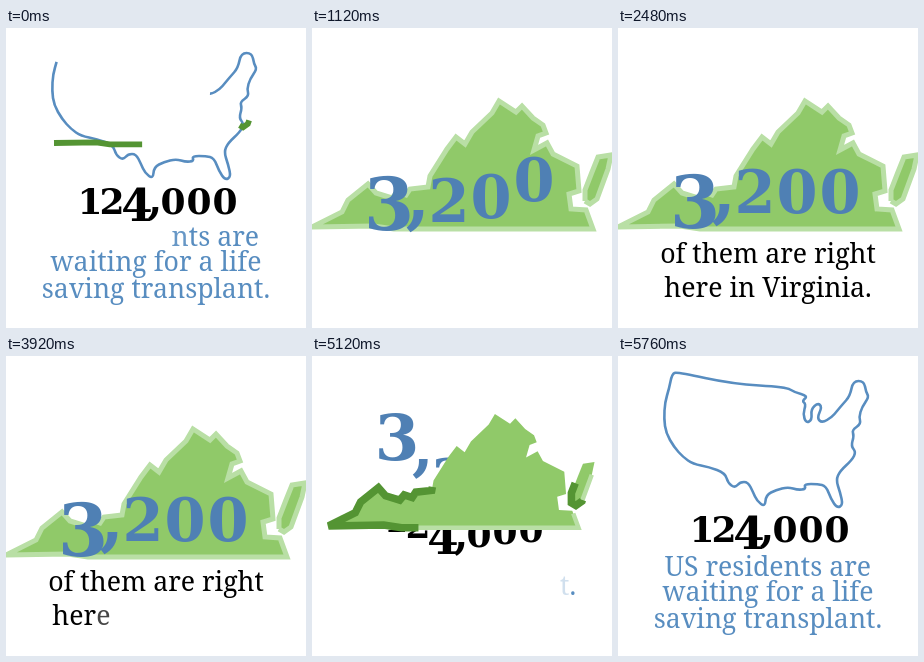
These frames come from a looping animation (300x300 px, 5.84 s). An HTML page:

```html
<!DOCTYPE html>
<html lang="en">
<head>
<meta charset="utf-8">
<title>Waiting for a transplant</title>
<style>
  html, body { margin: 0; width: 100%; height: 100%; overflow: hidden; background: #fff; }
  svg { display: block; width: 100%; height: 100%; }
  text { text-anchor: middle; }
  .copy { font: 26.7px "Noto Serif", serif; }
  .digit { font-family: "DejaVu Serif", serif; font-weight: bold; }
  #usa { fill: none; stroke: #588dc0; stroke-width: 2.6; stroke-linejoin: round; }
  .land { fill: #90c969; }
  .pale { fill: none; stroke: #b9dfa5; stroke-width: 5; }
  .dark { fill: none; stroke: #549433; stroke-width: 8.5; }
</style>
</head>
<body>
<svg viewBox="0 0 300 300">
  <path id="usa" pathLength="1"/>
  <g id="residents" fill="#588dc0"></g>
  <g id="total"></g>
  <g id="behind"></g>
  <g id="virginia"></g>
  <g id="front"></g>
  <g id="local"></g>
</svg>
<script>
const LOOP = 5840, MIRROR = 5600, STEP = 80;
const $ = id => document.getElementById(id);
const clamp = v => Math.min(1, Math.max(0, v));
const progress = (t, from, to) => clamp((t - from) / (to - from));
const ease = p => (1 - Math.cos(Math.PI * p)) / 2;
const mix = (a, b, p) => a + (b - a) * p;

function add(parent, tag, attrs = {}, text = '') {
  const node = document.createElementNS('http://www.w3.org/2000/svg', tag);
  for (const key in attrs) node.setAttribute(key, attrs[key]);
  node.textContent = text;
  parent.append(node);
  return node;
}

// Closed curve through the midpoints of a rough outline.
function smooth(points) {
  const p = points.split(' ').map(s => s.split(',').map(Number));
  const mid = (a, b) => `${(a[0] + b[0]) / 2},${(a[1] + b[1]) / 2}`;
  return `M${mid(p[p.length - 1], p[0])}` +
    p.map((a, i) => `Q${a} ${mid(a, p[(i + 1) % p.length])}`).join('') + 'Z';
}

// Shows only the part from a to b of a closed path; may wrap past 1.
function trim(path, a, b) {
  const length = Math.min(1, b - a);
  path.style.display = length > 0 ? '' : 'none';
  path.style.strokeDasharray = `${length} ${1 - length}`;
  path.style.strokeDashoffset = -a;
}

function typedLines(parent, lines) {
  const letters = [];
  let index = 0;
  for (const [y, text] of lines) {
    const line = add(parent, 'text', { x: 150, y, class: 'copy' });
    for (const c of text) letters.push({ node: add(line, 'tspan', {}, c), index: index++ });
    index++;
  }
  return letters;
}

function digits(parent, fill, specs) {
  return specs.map(([c, x, y, size]) => ({
    x, y, node: add(parent, 'text', { class: 'digit', fill, 'font-size': size }, c)
  }));
}

$('usa').setAttribute('d', smooth(
  '59,16 54,18 51,33 47,46 46,63 48,77 56,91 65,101 75,108 91,111 107,117 ' +
  '110,127 117,132 122,126 130,126 135,136 139,145 147,151 148,139 158,134 ' +
  '170,131 180,134 188,133 186,128 200,128 208,130 213,143 219,152 225,149 ' +
  '222,136 218,124 222,115 234,104 238,96 233,90 236,80 234,74 243,68 241,61 ' +
  '244,51 251,41 248,36 246,25 235,25 232,40 224,49 219,55 214,61 204,67 ' +
  '199,62 204,51 200,47 193,53 194,64 188,67 185,58 188,48 184,45 190,40 176,36 168,31 115,28'));

const shapes = [
  'M0,199L62,198L82,201L281,201L274,182L259,181L257,166L267,163L265,138L241,126L235,115' +
  'L222,122L226,108L234,105L231,97L221,90L210,78L204,84L187,73L180,85L160,104L153,116L144,109' +
  'L135,121L118,148L116,159L98,161L94,167L85,164L80,170L64,165L56,156L36,172L30,184Z',
  'M273,173L278,176L285,171L296,141L299,127L286,129L280,144L273,162Z'
];
const outline = name => shapes.map(d => add($('virginia'), 'path', { d, class: name, pathLength: 1 }));
const land = outline('land'), pale = outline('pale'), dark = outline('dark');

const residents = typedLines($('residents'), [
  [220, 'US residents are'], [245, 'waiting for a life'], [272, 'saving transplant.']]);
const local = typedLines($('local'), [[235, 'of them are right'], [269, 'here in Virginia.']]);

const total = digits($('total'), '#000', [
  ['1', 84, 186, 36], ['2', 106, 186, 36], ['4', 131, 193, 45], [',', 149, 186, 42],
  ['0', 167, 186, 36], ['0', 193, 186, 36], ['0', 219, 186, 36]]);
const count = digits($('behind'), '#4f80b4', [
  ['3', 77, 200, 72], [',', 106, 187, 70], ['2', 137, 185, 59], ['0', 179, 185, 59], ['0', 222, 185, 59]]);

// Leap up, hang, drop below the baseline, settle.
function leap(u) {
  if (u < 600) return -125 * (1 - (1 - progress(u, 350, 600)) ** 2);
  if (u < 1030) return mix(-125, 9, ease(progress(u, 760, 1030)));
  return mix(9, 0, ease(progress(u, 1030, 1160)));
}

// Small dip, then up behind the state.
const duck = u => u < 370
  ? 7 * ease(progress(u, 220, 370))
  : mix(7, -10, ease(progress(u, 370, 490)));

function draw(time) {
  // The second half plays the first half backwards.
  const s = Math.min(time, MIRROR - time);

  trim($('usa'), 0.07 * Math.max(0, (s + 100) / 100), 1 - 0.25 * Math.max(0, (s + 100) / 100));

  $('residents').setAttribute('transform', `translate(0 ${-33 * progress(s, -100, 480) ** 1.5})`);
  for (const { node, index } of residents) {
    const start = -100 + 11 * index;
    node.style.fillOpacity = 1 - progress(s, start, start + 11);
  }
  for (const { node, index } of local) {
    const start = 1340 + 15.5 * index;
    node.style.fillOpacity = progress(s, start, start + 20);
  }

  const grow = ease(progress(s, 240, 640));
  const scale = mix(0.68, 1, grow), left = mix(48, 0, grow), top = mix(115, 199, grow);
  $('virginia').setAttribute('transform', `translate(${left} ${top}) scale(${scale}) translate(0 -199)`);
  const retreat = Math.max(0, (s - 250) / 230);
  for (const i of [0, 1]) {
    land[i].style.opacity = progress(s, 160, 400);
    trim(pale[i], 0, progress(s, 300, 770));
    trim(dark[i], 0.81 * retreat, s < 550 ? progress(s, -50, 250) + 0.13 * retreat : 0);
  }

  total.forEach(({ node, x, y }, i) => {
    const u = s - 40 * i;
    node.style.display = u < 490 && s < 640 ? '' : 'none';
    node.setAttribute('transform', `translate(${x} ${y + duck(u)})`);
  });

  count.forEach(({ node, x, y }, i) => {
    const u = s - 40 * i, lift = leap(u);
    const layer = u > 680 ? $('front') : $('behind');
    if (node.parentNode !== layer) layer.append(node);
    node.style.display = u > 680 || lift < -20 ? '' : 'none';
    node.setAttribute('transform', `translate(${left + x * scale} ${y + lift}) scale(${scale})`);
  });
}

function frame() {
  draw(Math.floor(performance.now() % LOOP / STEP) * STEP);
  requestAnimationFrame(frame);
}
frame();
</script>
</body>
</html>
```
